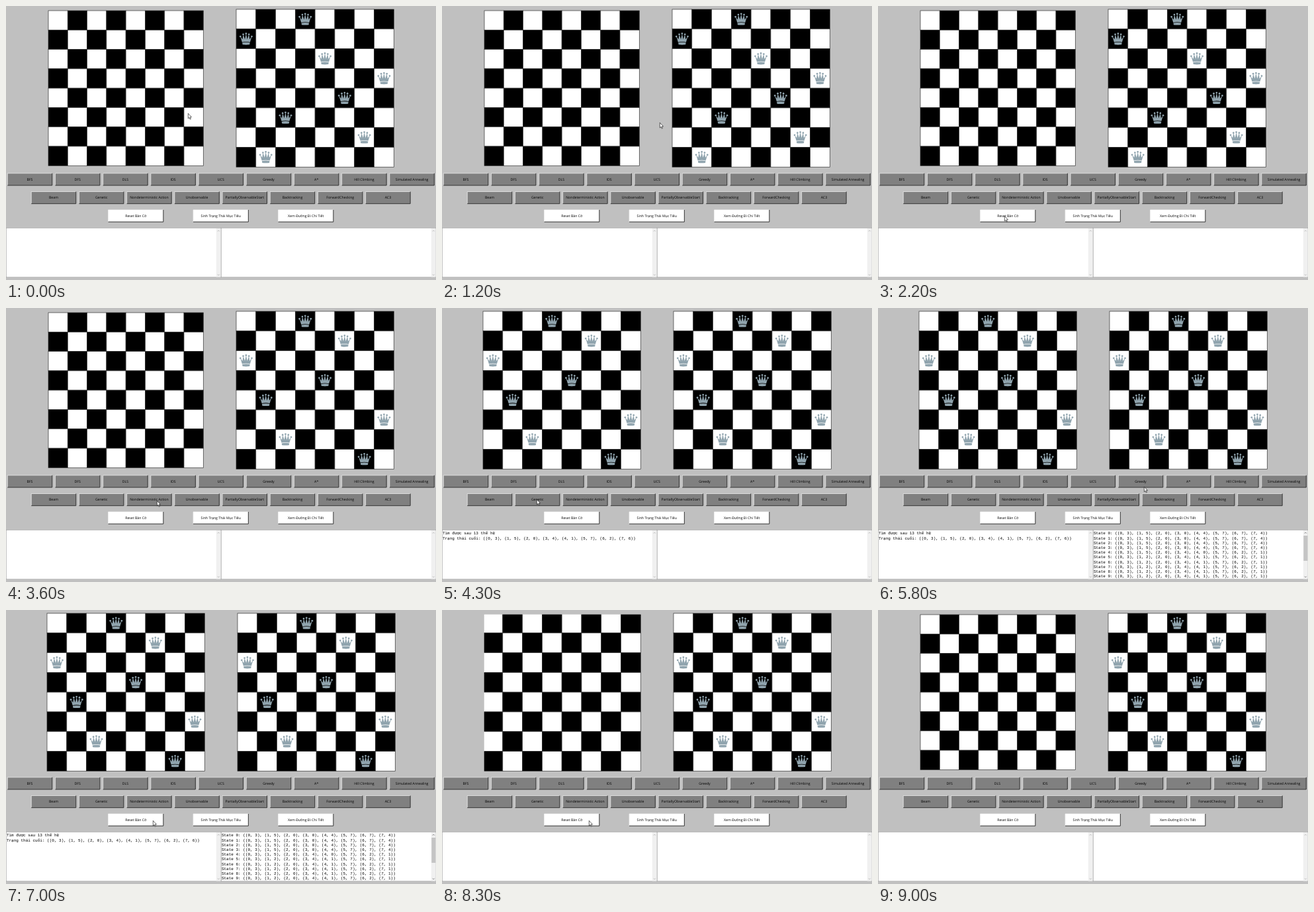
Write an HTML page that moves like this. It is 650 by 414 pixels and loops after 9600 ms.

```html
<!DOCTYPE html>
<html lang="vi">
<head>
<meta charset="utf-8">
<title>8 Queens</title>
<style>
  html, body { margin: 0; width: 100%; height: 100%; overflow: hidden; background: #c0c0c0; }
  svg { display: block; width: 100vw; height: 100vh; }
  .label { font: 5.2px "Open Sans", "Noto Sans", sans-serif; text-anchor: middle; }
  .log { font: 6px "Liberation Mono", monospace; }
  text { text-rendering: geometricPrecision; }
</style>
</head>
<body>
<svg id="stage" viewBox="0 0 650 414"></svg>
<script>
const LOOP = 9600, STEP = 100;
const GREY = '#c0c0c0';
const stage = document.getElementById('stage');

// Each digit is the queen's column in that row.
const FIRST = '30475261', SOLUTION = '35041726';
const generation = i => i < 4 ? '35004774' : i < 5 ? '35040721' : '32041721';
const tuple = columns => `(${[...columns].map((col, row) => `(${row}, ${col})`).join(', ')})`;

const ALGORITHMS = [
  ['BFS', 'DFS', 'DLS', 'IDS', 'UCS', 'Greedy', 'A*', 'Hill Climbing', 'Simulated Annealing'],
  ['Beam', 'Genetic', 'Nondeterministic Action', 'Unobservable', 'PartiallyObservableStart',
   'Backtracking', 'ForwardChecking', 'AC3']
];
const [RESET, NEW_GOAL, DETAILS] = ['Reset Bàn Cờ', 'Sinh Trạng Thái Mục Tiêu', 'Xem Đường Đi Chi Tiết'];

// Moments at which the interface responds.
const GOAL_AT = 3200, SOLVED_AT = 4300, DETAILS_AT = 5700, RESET_AT = 8200, SETTLED_AT = 8400;

// Pointer moves; it rests between them. A press lasts for one step.
const MOVES = [
  { from: 0, until: 900, to: [329, 176] },
  { from: 1700, until: 1800, to: [325, 204] },
  { from: 1900, until: 2200, to: [191, 317], press: RESET, at: 2500 },
  { from: 2500, until: 3000, to: [331, 315], press: NEW_GOAL, at: GOAL_AT },
  { from: 3400, until: 3600, to: [228, 291] },
  { from: 3600, until: 4100, to: [143, 289], press: 'Genetic', at: SOLVED_AT - STEP },
  { from: SOLVED_AT, until: 4900, to: [337, 192] },
  { from: 5200, until: 5600, to: [448, 317], press: DETAILS, at: DETAILS_AT - STEP },
  { from: DETAILS_AT, until: 6100, to: [343, 209] },
  { from: 6200, until: 7000, to: [222, 318], press: RESET, at: RESET_AT - STEP },
  { from: 8300, until: 8800, to: [660, 70] }
];

const rect = (x, y, w, h, fill, extra = '') =>
  `<rect x="${x}" y="${y}" width="${w}" height="${h}" fill="${fill}" ${extra}/>`;
const path = (d, extra = '') => `<path d="${d}" ${extra}/>`;
const line = (d, color, width) => path(d, `fill="none" stroke="${color}" stroke-width="${width}"`);
const text = (cls, x, y, value) => `<text class="${cls}" x="${x}" y="${y}">${value}</text>`;

function queenShape() {
  let balls = '', crown = 'M';
  for (let i = -2; i <= 2; i++) {
    const x = 4.3 * i, y = 1.1 * i * i - 8;
    balls += `<circle cx="${x}" cy="${y}" r="1.35"/>`;
    crown += `${x} ${y} `;
    if (i < 2) crown += `${3.6 * (i + .5)} .6 `;
  }
  return balls + path(crown + '6 5Q0 3.6-6 5Z') + path('M-5.8 5.8Q0 4.4 5.8 5.8L5.3 8.6Q0 9.3-5.3 8.6Z');
}
const QUEEN = queenShape();

function board(x, y, size, queens = '') {
  const cell = size / 8;
  let out = '';
  for (let i = 0; i < 64; i++) {
    const row = i >> 3, col = i & 7;
    out += rect(x + col * cell, y + row * cell, cell, cell,
      (row + col) % 2 ? '#000' : '#fff', 'stroke="#333" stroke-width=".7"');
  }
  [...queens].forEach((col, row) => {
    const cx = x + (+col + .5) * cell, cy = y + (row + .5) * cell;
    out += `<g transform="translate(${cx} ${cy})" fill="#90a4ae">${QUEEN}</g>`;
  });
  return out;
}

function button(label, cx, y, width, fill, time) {
  const x = cx - width / 2, right = x + width, bottom = y + 18.2;
  const down = MOVES.some(move => move.press === label && move.at === time);
  const [upper, lower] = down ? ['#333', '#f4f4f4'] : ['#f4f4f4', '#333'];
  return rect(x, y, width, 18.2, fill)
    + line(`M${x} ${bottom}V${y}H${right}`, upper, .7)
    + line(`M${x} ${bottom}H${right}V${y}`, lower, 1)
    + text('label', cx, y + 10.9, label);
}

function buttons(time) {
  const algorithms = ALGORITHMS.map((names, row) => names.map((name, i) =>
    button(name, 36 + row * 36 + i * 72.2, 252.8 + row * 27.7, 67.5, '#808080', time)).join(''));
  const actions = [RESET, NEW_GOAL, DETAILS].map((name, i) =>
    button(name, 196.2 + i * 128.5, 308, 83.3, '#fff', time));
  return [...algorithms, ...actions].join('');
}

function textBox(x, lines, scrollable) {
  const bar = x + 317.5, mid = bar + 3.5;
  return rect(x, 335.5, 324.5, 74.3, '#fff', 'stroke="#999" stroke-width=".5"')
    + rect(bar, 336, 6.8, 73.5, '#f0f0f0')
    + (scrollable ? rect(bar + .5, 344, 6, 38, '#c4c4c4') : '')
    + line(`M${mid - 1.5} 340.5l1.5-1.5 1.5 1.5M${mid - 1.5} 405.5l1.5 1.5 1.5-1.5`,
      scrollable ? '#555' : '#aaa', .7)
    + lines.map((value, i) => text('log', x + .6, 342.4 + i * 7.2, value)).join('');
}

function pointer(time) {
  let x = 275, y = 162;
  for (const { from, until, to } of MOVES) {
    const p = Math.min(1, Math.max(0, (time - from) / (until - from)));
    const eased = p * (2 - p);
    x += (to[0] - x) * eased;
    y += (to[1] - y) * eased;
  }
  return path('M.3.3V8L2 6.5 3.2 9.2 4.4 8.7 3.2 6H5.5Z',
    `transform="translate(${x} ${y})" fill="#fff" stroke="#000" stroke-width=".6"`);
}

function leftBoard(time) {
  if (time < SOLVED_AT || time >= SETTLED_AT) return board(64, 7, 234.3);
  if (time < RESET_AT) return board(62, 5, 238.3, SOLUTION);
  // The emptied board keeps its larger grid for a moment, trimmed at the top and left.
  return board(62, 5, 238.3) + rect(61, 4, 240, 2.7, GREY) + rect(61, 4, 2.7, 240, GREY);
}

function render(time) {
  const solved = time >= SOLVED_AT && time < RESET_AT;
  const detailed = solved && time >= DETAILS_AT;
  const shifted = time >= SOLVED_AT && time < SETTLED_AT;
  const result = solved ? ['Tìm được sau 13 thế hệ', `Trạng thái cuối: ${tuple(SOLUTION)}`] : [];
  const states = detailed ? Array.from({ length: 10 }, (_, i) => `State ${i}: ${tuple(generation(i))}`) : [];
  stage.innerHTML = rect(0, 0, 650, 414, GREY)
    + leftBoard(time)
    + board(shifted ? 350 : 348, 5, 238.3, time < GOAL_AT ? FIRST : SOLUTION)
    + buttons(time)
    + textBox(.3, result, false)
    + textBox(325.3, states, detailed)
    + pointer(time);
}

let shown = -1;
const start = performance.now();
function tick() {
  const time = Math.floor((performance.now() - start) % LOOP / STEP) * STEP;
  if (time !== shown) render(shown = time);
  requestAnimationFrame(tick);
}
tick();
</script>
</body>
</html>
```
